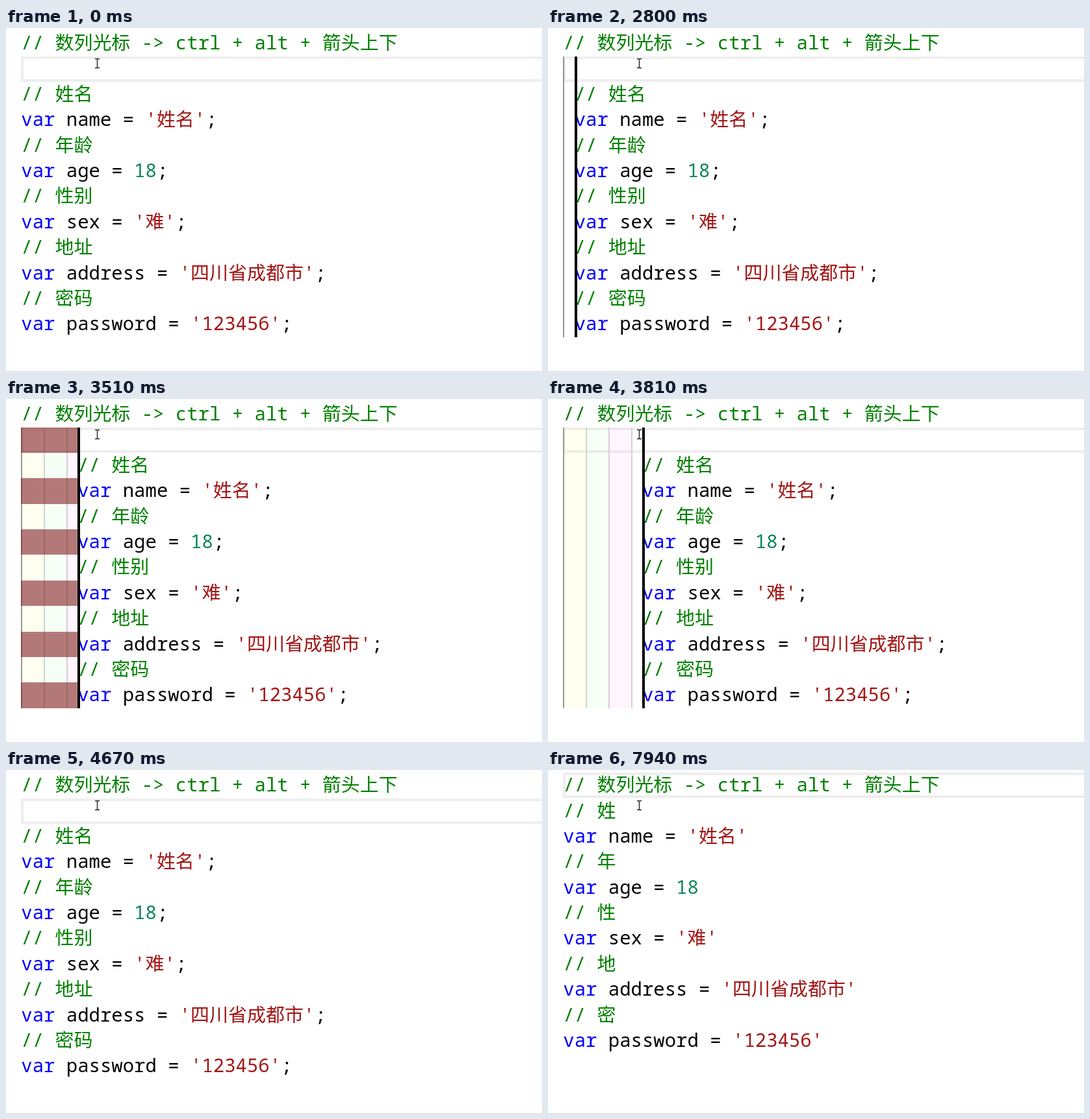
Recreate the animation shown at these times as an HTML page with a canvas. Size 825 by 529 pixels, loop 8 s.

```html
<!DOCTYPE html>
<html lang="zh-CN">
<head>
<meta charset="utf-8">
<style>
html, body { margin: 0; width: 825px; height: 529px; overflow: hidden; background: #fff; }
canvas { display: block; }
</style>
</head>
<body>
<canvas id="stage" width="825" height="529"></canvas>
<script>
const ctx = document.getElementById('stage').getContext('2d');
const LOOP = 8000, SIZE = 28.97, CELL = SIZE * 0.6, LEFT = 23.3, ROW = 39.36;
const MONO = `${SIZE}px "Noto Sans Mono", "DejaVu Sans Mono", monospace`;
const HAN = `300 ${SIZE}px "Noto Sans CJK SC", "Noto Sans CJK", sans-serif`;
const BEFORE = [
  '// 数列光标 -> ctrl + alt + 箭头上下', '',
  '// 姓名', "var name = '姓名';",
  '// 年龄', 'var age = 18;',
  '// 性别', "var sex = '难';",
  '// 地址', "var address = '四川省成都市';",
  '// 密码', "var password = '123456';"
];
// Backspace on every caret: the empty line joins the first one
const AFTER = [BEFORE[0], ...BEFORE.slice(2).map(s => s.slice(0, -1))];
const TOKENS = /\/\/.*|\bvar\b|'[^']*'|\d+|\s+|[^\s]/g;
const RAINBOW = ['255,255,64', '127,255,127', '255,127,255', '79,236,236'].map(c => `rgba(${c},.07)`);

const TYPED = [2800, 2970, 3150, 3290, 3430, 3580, 3740];
const BLINKS = [230, 700, 1000, 4670, 4970, 5450, 5980, 7070, 7390, 7940];
const SELECT = 3890, DELETE = 4210, END = 4970, JOIN = 6070, WIDE = 6520, UNDO = 7390;

const passed = (times, t) => times.filter(s => t >= s).length;
const rowTop = row => Math.round(4.3 + ROW * row);
const advance = ch => ch > '\u2000' ? SIZE : CELL;
const textWidth = text => [...text].reduce((sum, ch) => sum + advance(ch), 0);

function box(color, x, y, w, h) {
  ctx.fillStyle = color;
  ctx.fillRect(x, y, w, h);
}

function colorOf(token) {
  if (token.startsWith('//')) return '#008000';
  if (token === 'var') return '#0000ff';
  if (token[0] === "'") return '#a31515';
  return /^\d/.test(token) ? '#098658' : '#000';
}

function drawLine(text, x, row) {
  for (const token of text.match(TOKENS) || []) {
    ctx.fillStyle = colorOf(token);
    for (const ch of token) {
      ctx.font = ch > '\u2000' ? HAN : MONO;
      ctx.fillText(ch, x, rowTop(row) + 29);
      x += advance(ch);
    }
  }
}

function drawHighlight(row) {
  ctx.strokeStyle = '#eee';
  ctx.lineWidth = 4;
  ctx.strokeRect(25, rowTop(row) + 2, 820, 35);
}

function drawIndent(text, row, spaces, tinted, selected) {
  const y = rowTop(row), h = rowTop(row + 1) - y;
  if (selected) {
    ctx.fillStyle = '#add6ff';
    ctx.beginPath();
    ctx.roundRect(LEFT, y + 2, spaces * CELL, h - 2, [0, 5, 5, 0]);
    ctx.fill();
  }
  for (let i = 0; i < spaces; i += 2)
    box(i ? '#d3d3d3' : '#939393', Math.round(LEFT + i * CELL), y, 2, h);
  if (tinted % 2 && !text.startsWith('//')) {
    box('rgba(128,32,32,.6)', 23, y, tinted * CELL, h);
  } else {
    for (let i = 0; i < tinted; i += 2)
      box(RAINBOW[i / 2], LEFT + i * CELL, y, Math.min(2, tinted - i) * CELL, h);
  }
  if (!selected) return;
  ctx.fillStyle = 'rgba(51,51,51,.3)';
  for (let i = 0; i < spaces; i++) {
    ctx.beginPath();
    ctx.arc(LEFT + (i + 0.5) * CELL, y + 19, 2.4, 0, 7);
    ctx.fill();
  }
}

function drawPointer(faint) {
  ctx.strokeStyle = faint ? 'rgba(0,0,0,.2)' : '#222';
  ctx.lineWidth = 1.4;
  ctx.stroke(new Path2D('M137 47.5h2.5l1 1l1-1h2.5M140.5 48v13M137 61.5h2.5l1-1l1 1h2.5'));
}

function draw(t) {
  const joined = t >= JOIN;
  const spaces = t < DELETE ? passed(TYPED, t) : 0;
  const tinted = t < DELETE ? passed(TYPED, t - 80) : 0;
  const selected = t >= SELECT && t < DELETE;
  const first = joined ? 0 : 1;
  const added = Math.max(0, Math.min(10, Math.floor((t - 1000) / 147) + 1));
  const suffix = t >= WIDE && t < UNDO ? '；' : '';
  const lines = (joined ? AFTER : BEFORE).map(s => s + suffix);

  box('#fff', 0, 0, 825, 529);
  if (!selected) drawHighlight(first);
  lines.forEach((text, row) => {
    const indent = row ? spaces : 0;
    if (indent) drawIndent(text, row, indent, tinted, selected);
    drawLine(text, LEFT + indent * CELL, row);
  });

  if (passed(BLINKS, t) % 2) {
    for (let row = first; row <= first + added; row++) {
      const offset = t >= END ? textWidth(lines[row]) : selected ? 0 : spaces * CELL;
      box('#000', Math.round(LEFT + offset), rowTop(row), 4, rowTop(row + 1) - rowTop(row));
    }
  }
  drawPointer(selected);
}

function tick() {
  draw(performance.now() % LOOP);
  requestAnimationFrame(tick);
}
tick();
</script>
</body>
</html>
```
